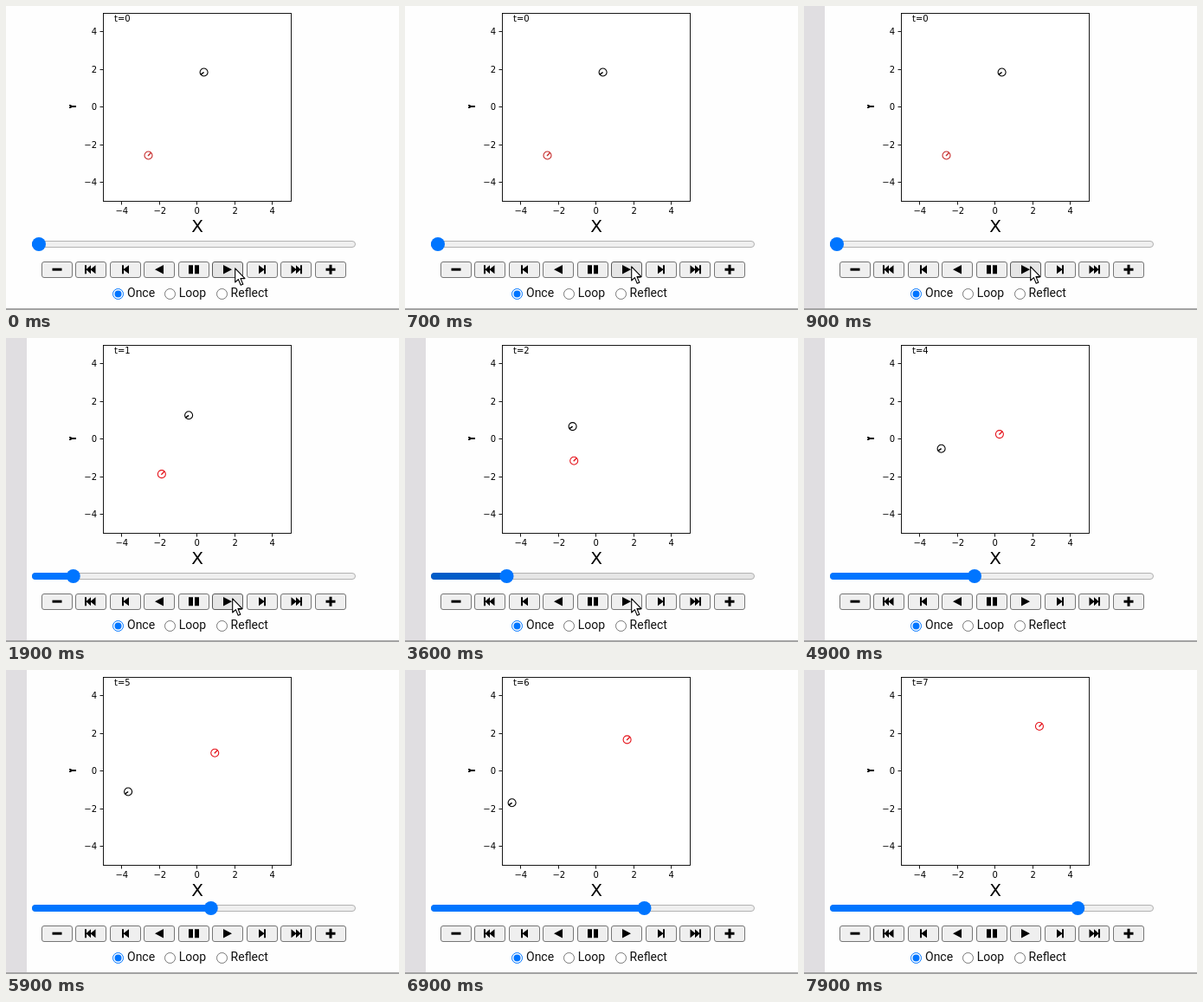
Recreate the animation shown at these times as an HTML page. Size 454 by 351 pixels, loop 8000 ms.

```html
<!DOCTYPE html>
<html lang="en">
<head>
<meta charset="utf-8">
<title>Animation player</title>
<style>
html, body { margin: 0; width: 100%; height: 100%; overflow: hidden; background: #fefefe; }
svg { display: block; width: 454px; height: 351px; }
.plot text { font: 10px "DejaVu Sans", sans-serif; }
.plot .title { font-size: 20px; }
.modes text { font: 14px Roboto, sans-serif; fill: #111; }
</style>
</head>
<body>
<svg id="stage" viewBox="0 0 454 351" xmlns="http://www.w3.org/2000/svg">
  <defs><clipPath id="axes"><rect x="112" y="8" width="218" height="218"/></clipPath></defs>
  <rect width="454" height="351" fill="#fefefe"/>
  <rect id="sidebar" width="24" height="349" fill="#e0dee1"/>
  <rect y="349" width="454" height="2" fill="#a3a3a3"/>
  <g class="plot">
    <rect x="112.5" y="8.5" width="217" height="217" fill="#fff" stroke="#000" stroke-width="0.9"/>
    <g id="ticks"></g>
    <text id="time" x="125" y="18"></text>
    <text class="title" x="221" y="261" text-anchor="middle">X</text>
    <path d="M73 114H75L76 115H81V117H76L75 118H73V117L74 116L73 115Z"/>
    <g clip-path="url(#axes)" fill="none" stroke-width="1.1">
      <g id="black" stroke="#000"><circle r="4.5"/><path d="M0 0L-3.6 2.6" stroke-width="1.5"/></g>
      <g id="red"><circle r="4.5"/><path d="M-.5 .5L3.2 -3.2" stroke-width="1.4"/></g>
    </g>
  </g>
  <rect id="track" x="30.5" y="271.5" width="373" height="7" rx="3.5" stroke="#b2b2b2"/>
  <rect id="progress" x="30" y="271" height="8" rx="4"/>
  <circle id="thumb" cy="275" r="8" fill="#0075ff"/>
  <g id="buttons"></g>
  <g id="modes" class="modes"></g>
  <path id="cursor" d="M.7 .8V17L4.4 13.6L7.2 20.3L9.8 19.2L7 12.6H12Z" fill="#fff" stroke="#000" stroke-width="1.1" stroke-linejoin="round"/>
</svg>
<script>
const $ = id => document.getElementById(id);

function add(parent, tag, attrs, text) {
  const el = document.createElementNS("http://www.w3.org/2000/svg", tag);
  set(el, attrs);
  if (text) el.textContent = text;
  parent.append(el);
  return el;
}
function set(el, attrs) {
  for (const key in attrs) el.setAttribute(key, attrs[key]);
}

// Axis ticks
const tickX = [133.5, 177.5, 220.5, 264.5, 307.5];
const tickY = [203.5, 160.5, 116.5, 73.5, 29.5];
["−4", "−2", "0", "2", "4"].forEach((label, i) => {
  const x = tickX[i], y = tickY[i];
  add($("ticks"), "path", { d: `M${x} 226v3.5M112 ${y}h-3.5`, stroke: "#000", "stroke-width": 0.9 });
  add($("ticks"), "text", { x: x + 0.3, y: 240, "text-anchor": "middle" }, label);
  add($("ticks"), "text", { x: 105, y: y + 3.6, "text-anchor": "end" }, label);
});

// Control buttons, icons drawn around their centre
const icons = [
  "M-5.5 -1.5h11v3h-11z",
  "M-7 -5h2v4.5l5 -4.5v4.5l5.5 -4.5v10l-5.5 -4.5v4.5l-5 -4.5v4.5h-2z",
  "M-4 -5h2v4.5l6 -4.5v10l-6 -4.5v4.5h-2z",
  "M5 -5.2v10.4l-10 -5.2z",
  "M-6 -5h5v10h-5zM1 -5h5v10h-5z",
  "M-5 -5.2v10.4l10 -5.2z",
  "M4 -5h-2v4.5l-6 -4.5v10l6 -4.5v4.5h2z",
  "M7 -5h-2v4.5l-5 -4.5v4.5l-5.5 -4.5v10l5.5 -4.5v4.5l5 -4.5v4.5h2z",
  "M-5.5 -1.5h4v-4h3v4h4v3h-4v4h-3v-4h-4z"
];
const buttons = icons.map((d, i) => {
  const x = Math.round(41 + 39.45 * i);
  const box = add($("buttons"), "rect", { x: x + 0.5, y: 295.5, width: 35, height: 18, rx: 2.5 });
  add($("buttons"), "path", { d, transform: `translate(${x + 18} 304.2)` });
  return box;
});

["Once", "Loop", "Reflect"].forEach((label, i) => {
  const cx = 129.5 + 60 * i, on = i === 0;
  add($("modes"), "circle", { cx, cy: 332.5, r: 6, fill: "#fff", stroke: on ? "#0075ff" : "#767676" });
  if (on) add($("modes"), "circle", { cx, cy: 332.5, r: 4, fill: "#0075ff" });
  add($("modes"), "text", { x: 140 + 59.8 * i, y: 336 }, label);
});

// Pointer stops: [start ms, x, y]
const stops = [
  [0, 264, 302], [300, 263, 301], [600, 262, 301], [700, 261, 300],
  [3700, 238, 292], [3800, 203, 280], [3900, 166, 266],
  [4000, 131, 251], [4100, 98, 236], [4200, 72, 222]
];
const stepTimes = [1900, 2900, 3900, 4900, 5900, 6900, 7900];

function draw(ms) {
  const step = stepTimes.filter(t => ms >= t).length;
  const overSlider = ms >= 3600 && ms < 3800;
  const x = 38 + 39.75 * step;

  $("sidebar").style.display = ms >= 900 ? "" : "none";
  $("time").textContent = "t=" + step;
  set($("black"), { transform: `translate(${228.6 - 17.5 * step} ${76.5 + 12.8 * step})` });
  set($("red"), {
    transform: `translate(${164.5 + 15.35 * step} ${172.5 - 15.35 * step})`,
    stroke: step ? "#e5141c" : "#c62b2b"
  });

  set($("track"), { fill: overSlider ? "#e5e5e5" : "#efefef" });
  set($("progress"), { width: x - 30, fill: overSlider ? "#005cc8" : "#0075ff" });
  set($("thumb"), { cx: x });
  buttons.forEach((box, i) => {
    const hot = i === 5 && ms < 3600;
    set(box, { fill: hot ? "#e5e5e5" : "#efefef", stroke: hot ? "#5a5a5a" : "#767676" });
  });

  const [, px, py] = stops.filter(s => ms >= s[0]).pop();
  set($("cursor"), { transform: `translate(${px} ${py})` });
  $("cursor").style.display = ms < 4300 ? "" : "none";
}

const start = performance.now();
function tick() {
  draw((performance.now() - start) % 8000);
  requestAnimationFrame(tick);
}
tick();
</script>
</body>
</html>
```
